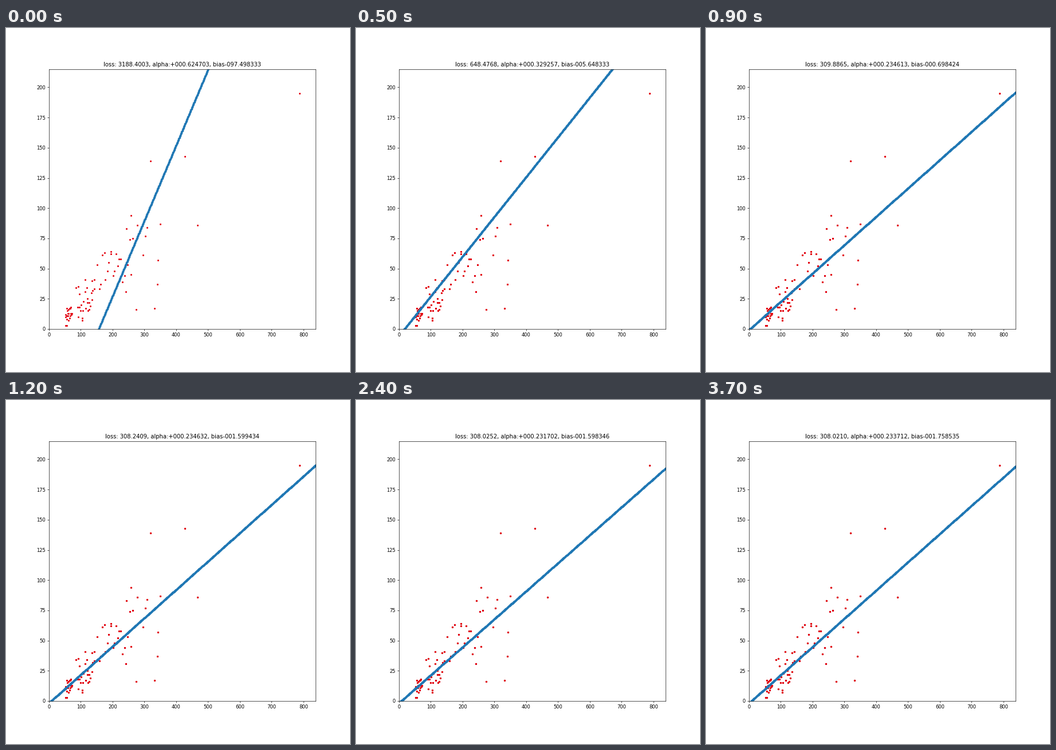
These frames come from a looping animation (600 by 600 pixels, 3800 ms). A matplotlib script:

```python
import numpy as np
import matplotlib.pyplot as plt
from matplotlib.animation import FuncAnimation

FRAMES, INTERVAL = 38, 100
X_MAX, Y_MAX = 838, 215
RED = "#e4000f"

# Best fits found by the search: step, loss, alpha, bias
FITS = np.array([(0, 3188.4003, 0.624703, -97.498333),
                 (3, 1357.0200, 0.423902, -10.598243),
                 (7, 309.8865, 0.234613, -0.698424),
                 (12, 308.2409, 0.234632, -1.599434),
                 (17, 308.1889, 0.234812, -1.698427),
                 (24, 308.0252, 0.231702, -1.598346),
                 (30, 308.0210, 0.233712, -1.758535)])
DESCENT_END = 7

# Points that stand apart from the cloud
OUTLIERS = [(319, 139), (427, 143), (467, 86), (788, 195),
            (258, 94), (243, 83), (278, 86), (308, 84),
            (350, 87), (303, 77), (295, 61), (343, 57),
            (341, 37), (332, 17), (274, 16), (195, 62)]


def cloud(rng, count, start, end, spread):
    """Scatter whole-number points around the final trend."""
    x = np.linspace(start, end, count) + rng.uniform(-2, 2, count)
    noise = np.clip(rng.normal(0, spread, count), -2 * spread, 2 * spread)
    y = FITS[-1, 2] * x + FITS[-1, 3] + noise
    return np.column_stack([x, np.maximum(y, 3)]).round()


def make_points():
    rng = np.random.default_rng(4)
    return np.vstack([OUTLIERS,
                      cloud(rng, 22, 51, 70, 4),
                      cloud(rng, 28, 86, 143, 8),
                      cloud(rng, 22, 152, 263, 12)])


def fit_at(step):
    """Glide during the fast descent, then jump from fit to fit."""
    steps, loss, alpha, bias = FITS.T
    if step < DESCENT_END:
        return (np.exp(np.interp(step, steps, np.log(loss))),
                np.interp(step, steps, alpha),
                np.interp(step, steps, bias))
    return FITS[np.argmin(np.abs(steps - step)), 1:]


plt.rcParams["text.kerning_factor"] = 6
fig, ax = plt.subplots(figsize=(10, 10), dpi=60)
fig.subplots_adjust(left=0.125, right=0.9, bottom=0.125, top=0.8803)
ax.set_xlim(0, X_MAX)
ax.set_ylim(0, Y_MAX)

# The data is plotted once more each step, so its soft edges fill in
points = make_points()
layers = [ax.plot(*points.T, ".", color=RED, markersize=5.3, zorder=1)[0]
          for _ in range(FRAMES)]
line_x = np.arange(X_MAX + 2)
line, = ax.plot([], [], ".", color="C0", markersize=6.8, zorder=2)
title = ax.set_title("")


def update(step):
    loss, alpha, bias = fit_at(step)
    line.set_data(line_x, alpha * line_x + bias)
    title.set_text(f"loss: {loss:.4f}, alpha:{alpha:+011.6f}, bias{bias:+011.6f}")
    for i, layer in enumerate(layers):
        layer.set_visible(i <= step)
    return [line, title, *layers]


anim = FuncAnimation(fig, update, frames=FRAMES, interval=INTERVAL,
                     repeat=True, repeat_delay=0, blit=False)
plt.show()
```
